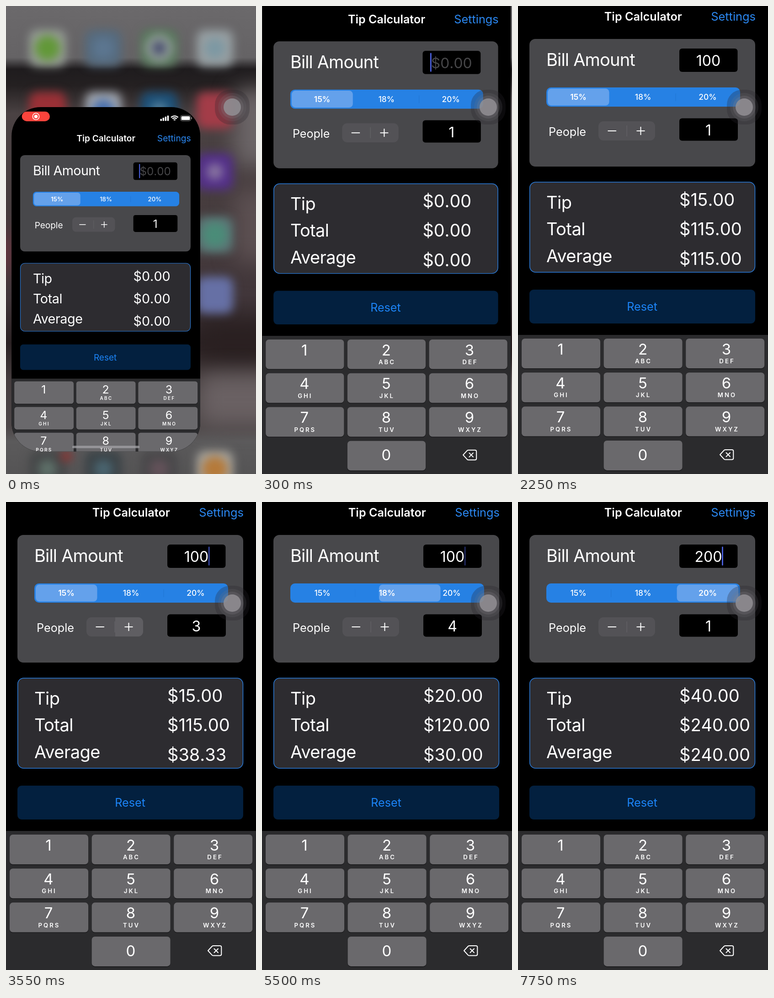
Animation of 547 by 1023 pixels, one loop 8000 ms. Source, as an HTML page with a canvas:

```html
<!DOCTYPE html>
<html lang="en">
<head>
<meta charset="utf-8">
<title>Tip Calculator</title>
<style>
html, body { margin: 0; width: 100%; height: 100%; overflow: hidden; background: #000; }
canvas { display: block; width: 547px; height: 1023px; }
</style>
</head>
<body>
<canvas id="stage" width="547" height="1023"></canvas>
<script>
const W = 547, H = 1023, LOOP = 8000, STEP = 50;
const stage = document.getElementById('stage');
const ctx = stage.getContext('2d');
const FONT = 'Inter, "Liberation Sans", sans-serif';

const clamp = v => Math.max(0, Math.min(1, v));
const ramp = (t, start, len) => clamp((t - start) / len);
const smooth = u => u * u * (3 - 2 * u);
const during = (t, a, b) => t >= a && t < b;

// Value of the last [time, value] pair already reached.
function at(t, steps) {
  let value = steps[0][1];
  for (const [time, v] of steps) if (t >= time) value = v;
  return value;
}

function box(c, x, y, w, h, r, fill) {
  c.beginPath();
  c.roundRect(x, y, w, h, r);
  c.fillStyle = fill;
  c.fill();
}

function disc(c, x, y, r, fill) {
  c.beginPath();
  c.arc(x, y, r, 0, Math.PI * 2);
  c.fillStyle = fill;
  c.fill();
}

function line(pts, width, color) {
  ctx.beginPath();
  pts.forEach(([x, y], i) => i ? ctx.lineTo(x, y) : ctx.moveTo(x, y));
  ctx.lineWidth = width;
  ctx.strokeStyle = color;
  ctx.stroke();
}

// Text whose capitals are centred on y.
function text(str, x, y, size, { color = '#fff', align = 'left', weight = 400, gap = 0, kern = 'auto' } = {}) {
  ctx.font = `${weight} ${size}px ${FONT}`;
  ctx.fontKerning = kern;
  ctx.letterSpacing = gap + 'px';
  ctx.textAlign = align;
  ctx.fillStyle = color;
  ctx.fillText(str, x + (align === 'center' ? gap / 2 : 0), y + size * 0.364);
}

function makeHome() {
  const cv = document.createElement('canvas');
  cv.width = W;
  cv.height = H;
  const c = cv.getContext('2d');
  const base = c.createLinearGradient(0, 0, 0, H);
  [[0, '#6b696b'], [0.11, '#656365'], [0.135, '#1f1c1e'], [0.17, '#242021'], [0.23, '#4a4243'],
   [0.5, '#453a3c'], [0.62, '#41363a'], [0.72, '#2b2223'], [0.8, '#453d3e'], [0.9, '#4d4748'],
   [0.93, '#5b5a5b'], [1, '#555455']].forEach(([p, col]) => base.addColorStop(p, col));
  c.fillStyle = base;
  c.fillRect(0, 0, W, H);

  c.filter = 'blur(24px)';
  box(c, 500, 180, 90, 170, 20, '#6c6668');
  box(c, 500, 400, 90, 160, 20, '#5c5052');
  box(c, 420, 690, 170, 90, 20, '#2a2021');
  box(c, 420, 805, 200, 110, 20, '#6a6163');
  box(c, -40, 500, 55, 80, 10, '#6d3340');

  c.filter = 'blur(10px)';
  const icon = (x, y, fill, dot, r = 24) => {
    box(c, x - 40, y - 40, 80, 80, 18, fill);
    if (dot) disc(c, x, y, r, dot);
  };
  icon(91, 92, '#969c96', '#629838', 28);
  icon(213, 92, '#566b7e', '#5c7690');
  icon(335, 92, '#56785a', '#8f9b95', 31);
  disc(c, 335, 92, 15, '#454a6e');
  icon(457, 92, '#979fa2', '#7c98a3', 22);
  icon(91, 228, '#9b3036');
  icon(213, 228, '#a0a5ad', '#476fae');
  icon(335, 228, '#1c5078', '#55819c', 18);
  icon(457, 228, '#a33c48');
  icon(457, 362, '#54308a', '#8773a0', 18);
  icon(457, 500, '#5c7777', '#4a8c78', 27);
  icon(457, 632, '#6670a5');
  icon(91, 1012, '#464849', '#5e7069', 20);
  disc(c, 132, 984, 12, '#90312f');
  icon(213, 1012, '#3c4448', '#4a6570', 20);
  icon(335, 1012, '#4a494b', '#64525a', 20);
  icon(457, 1012, '#a4a29c', '#b57a3a', 28);
  return cv;
}
const home = makeHome();

function statusBar() {
  box(ctx, 30, -54, 81, 28, 14, '#fb443c');
  disc(ctx, 70.7, -40, 5, '#fff');
  ctx.beginPath();
  ctx.arc(70.7, -40, 9.5, 0, 7);
  ctx.lineWidth = 2;
  ctx.strokeStyle = '#fff';
  ctx.stroke();
  for (let i = 0; i < 4; i++) {
    const h = 6 + i * 3.2;
    box(ctx, 431 + i * 6.7, -27 - h, 4.6, h, 1.3, '#fff');
  }
  for (const r of [5, 10.5, 16]) {
    ctx.beginPath();
    ctx.arc(472.5, -27, r - 1.6, -Math.PI * 0.75, -Math.PI * 0.25);
    ctx.lineWidth = 3.2;
    ctx.stroke();
  }
  ctx.beginPath();
  ctx.roundRect(489.5, -43, 30, 16, 5);
  ctx.lineWidth = 1.3;
  ctx.strokeStyle = '#8a8a8a';
  ctx.stroke();
  box(ctx, 492, -40.5, 25, 11, 2.5, '#fff');
  box(ctx, 521, -38, 2, 6, 1, '#8a8a8a');
}

const BILLS = [[0, ''], [1250, '1'], [1500, '10'], [1700, '100'], [6100, ''],
               [7000, '2'], [7400, '20'], [7600, '200']];
const PEOPLE = [[0, 1], [2950, 2], [3450, 3], [4050, 4], [6100, 1]];
const RATES = [[0, 0.15], [4750, 0.18], [5400, 0.2]];
const PRESSES = [['1', 1050, 1250], ['0', 1400, 1500], ['0', 1600, 1700],
                 ['2', 6850, 7050], ['0', 7350, 7400], ['0', 7550, 7600]];

function caretAlpha(t) {
  if (!during(t, 2050, 6050)) return 1;
  const ph = (t - 2050) % 1000;
  return 1 - ramp(ph, 0, 180) + ramp(ph, 370, 180);
}

function billCard(t) {
  const bill = at(t, BILLS);
  box(ctx, 25, 72, 494, 279, 13, '#48484b');
  text('Bill Amount', 62, 117, 38, { gap: -0.8 });

  box(ctx, 353, 93, 127.5, 51, 6, '#000');
  text(bill || '$0.00', 416.5, 119, 32, { align: 'center', kern: 'none', color: bill ? '#fff' : '#464648' });
  const caretX = bill ? 416.5 + ctx.measureText(bill).width / 2 + 1 : 371;
  ctx.globalAlpha = caretAlpha(t);
  box(ctx, caretX - 1.4, 97.5, 2.8, 41.5, 1.4, '#4c62e2');
  ctx.globalAlpha = 1;

  const slide = smooth(ramp(t, 4742, 300)) + smooth(ramp(t, 5380, 300));
  box(ctx, 62, 178, 424, 42, 10, '#2681e4');
  for (const i of [0, 1]) {
    const far = clamp(Math.abs(slide - i - 0.5) - 0.5);
    box(ctx, 203 + i * 141.5, 191, 1.2, 17, 0, `rgba(10,50,110,${0.12 * far})`);
  }
  box(ctx, 65 + slide * 141.3, 180.5, 134.5, 37, 8, '#64a1eb');
  ['15%', '18%', '20%'].forEach((label, i) =>
    text(label, 132 + i * 141.5, 199, 17.5, { align: 'center', weight: Math.round(slide) === i ? 600 : 500 }));

  text('People', 67, 275, 25.2);
  box(ctx, 176, 252, 124, 42, 11, '#535256');
  if (during(t, 2950, 3750) || during(t, 4050, 4200)) {
    box(ctx, 239, 252, 61, 42, [0, 11, 11, 0], '#5f5e62');
  }
  box(ctx, 237.5, 261, 1.2, 24, 0, '#656468');
  line([[196.5, 273], [215, 273]], 2, '#fff');
  line([[259.5, 273], [277.5, 273]], 2, '#fff');
  line([[268.5, 264], [268.5, 282]], 2, '#fff');
  box(ctx, 353, 245.5, 128, 49, 6, '#000');
  text(String(at(t, PEOPLE)), 416.5, 271, 32, { align: 'center' });
}

function results(t) {
  box(ctx, 25.7, 385, 492.8, 197, 13, '#2d2c30');
  ctx.lineWidth = 1.5;
  ctx.strokeStyle = '#2a7cdb';
  ctx.stroke();

  // An emptied bill keeps the last results on show.
  const held = during(t, 6100, 7000);
  const bill = held ? 100 : Number(at(t, BILLS));
  const people = held ? 4 : at(t, PEOPLE);
  const tip = bill * at(t, RATES), total = bill + tip;
  [['Tip', 429, tip, 423], ['Total', 487.5, total, 487.5], ['Average', 546, total / people, 552]]
    .forEach(([label, ly, value, vy]) => {
      text(label, 62, ly, 38, { gap: -0.5 });
      text('$' + value.toFixed(2), 353, vy, 38, { kern: 'none' });
    });
}

function resetButton(t) {
  box(ctx, 25, 620, 494, 74, 9, '#03203f');
  ctx.globalAlpha = during(t, 6000, 6200) ? 0.3 + 0.7 * ramp(t, 6080, 120) : 1;
  text('Reset', 271.5, 657, 25.2, { align: 'center', color: '#1c84f7' });
  ctx.globalAlpha = 1;
}

const LETTERS = ['', 'ABC', 'DEF', 'GHI', 'JKL', 'MNO', 'PQRS', 'TUV', 'WXYZ'];

function key(digit, letters, col, row, t) {
  const x = 8 + col * 179.6, y = 727 + row * 74.3, cx = [93, 273, 456][col];
  const down = PRESSES.some(([d, a, b]) => d === digit && during(t, a, b));
  box(ctx, x, y + 1.5, 172, 65, 7, '#19191b');
  box(ctx, x, y, 172, 65, 7, down ? '#454447' : '#6a696c');
  text(digit, cx, y + (row === 3 ? 31 : 22.8), 33, { align: 'center' });
  if (letters) text(letters, cx, y + 49.3, 13.2, { align: 'center', weight: 600, gap: 3 });
}

function keyboard(t) {
  box(ctx, 0, 719, W, 480, 0, '#2b2b2d');
  LETTERS.forEach((letters, i) => key(String(i + 1), letters, i % 3, Math.floor(i / 3), t));
  key('0', '', 1, 3, t);

  ctx.lineJoin = ctx.lineCap = 'round';
  ctx.beginPath();
  ctx.moveTo(442, 980.8);
  ctx.lineTo(451, 971);
  ctx.quadraticCurveTo(452, 970, 454, 970);
  ctx.lineTo(468, 970);
  ctx.quadraticCurveTo(471.3, 970, 471.3, 973);
  ctx.lineTo(471.3, 988.6);
  ctx.quadraticCurveTo(471.3, 991.6, 468, 991.6);
  ctx.lineTo(454, 991.6);
  ctx.quadraticCurveTo(452, 991.6, 451, 990.6);
  ctx.closePath();
  ctx.lineWidth = 2;
  ctx.strokeStyle = '#fff';
  ctx.stroke();
  line([[455.5, 976.5], [464, 985]], 2, '#fff');
  line([[464, 976.5], [455.5, 985]], 2, '#fff');
  ctx.lineCap = 'butt';
}

function touchButton() {
  box(ctx, 457, 183, 76, 76, 33, 'rgba(40,38,43,0.28)');
  disc(ctx, 495, 221, 31, 'rgba(120,118,124,0.16)');
  disc(ctx, 495, 221, 25, 'rgba(135,133,139,0.22)');
  disc(ctx, 495, 221, 19, 'rgba(146,144,149,0.85)');
}

function draw(t) {
  const open = Math.exp(-t / 77);
  const scale = 1 - 0.245 * open;
  const bottom = 1117 - 187 * open;

  ctx.drawImage(home, 0, 0);
  ctx.save();
  ctx.translate(12.1 * open, 271.6 * open);
  ctx.scale(scale, scale);
  ctx.beginPath();
  ctx.roundRect(0, -67, W, bottom + 67, 60 + 24 * open);
  ctx.clip();
  ctx.fillStyle = '#000';
  ctx.fillRect(0, -67, W, bottom + 67);

  statusBar();
  text('Tip Calculator', 273.7, 23, 25.2, { align: 'center', weight: 600 });
  text('Settings', 520, 23, 25.4, { align: 'right', color: '#2b88f2' });
  billCard(t);
  results(t);
  resetButton(t);
  keyboard(t);
  box(ctx, 176, bottom - 16.5, 195, 7, 3.5, 'rgba(165,165,168,0.75)');
  ctx.restore();
  touchButton();
}

// The picture advances in fixed steps, like a screen recording.
const begin = performance.now();
function tick() {
  const t = (performance.now() - begin + 5) % LOOP;
  draw(Math.floor(t / STEP) * STEP);
  requestAnimationFrame(tick);
}
tick();
</script>
</body>
</html>
```
